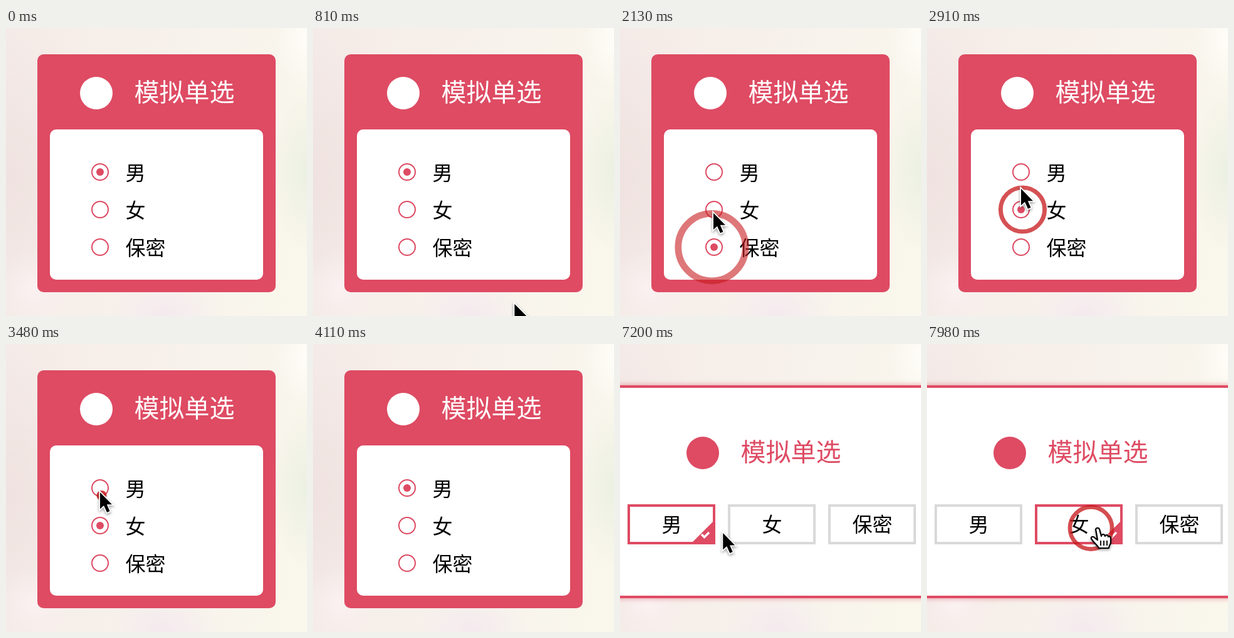
An HTML page for the animation above (8 s loop, 480x460 px).

```html
<!DOCTYPE html>
<html lang="zh-CN">
<head>
<meta charset="utf-8">
<title>模拟单选</title>
<style>
  html, body { margin: 0; width: 100%; height: 100%; overflow: hidden; }
  body {
    background:
      radial-gradient(circle at 45px 415px, #faf1f1, transparent 60px),
      radial-gradient(ellipse 60px 130px at 480px 230px, #ebf0e2, transparent),
      radial-gradient(ellipse 50px 80px at 480px 20px, #fefdf8, transparent),
      radial-gradient(ellipse 90px 70px at 250px 460px, #f4eaef, transparent),
      radial-gradient(ellipse 160px 260px at 0 240px, #efe2e0, transparent),
      linear-gradient(100deg, #f5ebe8, #f8f4ec 70%, #faf7ec);
  }
  svg { display: block; width: 480px; height: 460px; }
  text { font-family: "Noto Sans CJK SC", "Noto Sans CJK", sans-serif; font-size: 32px; }
  .title { font-size: 40px; }
  .mid { text-anchor: middle; }
  .glow { filter: drop-shadow(0 0 4px #de4b6399); }
  .pointer { filter: drop-shadow(0 2px 2px #0006); }
</style>
</head>
<body>
<svg viewBox="0 0 480 460">
  <g id="card">
    <rect x="50" y="42" width="380" height="380" rx="10" fill="#de4b63"/>
    <rect x="70" y="162" width="340" height="240" rx="10" fill="#fff"/>
    <circle cx="144" cy="104" r="26" fill="#fff"/>
    <text class="title" x="204.5" y="117" fill="#fff">模拟单选</text>
    <g id="radios"></g>
  </g>
  <g id="panel">
    <rect class="glow" x="-20" y="66" width="520" height="340" fill="#de4b63"/>
    <rect y="70" width="480" height="332" fill="#fff"/>
    <circle cx="132" cy="174" r="26" fill="#de4b63"/>
    <text class="title" x="192.5" y="187" fill="#de4b63">模拟单选</text>
    <g id="buttons"></g>
  </g>
  <circle id="press" r="8" fill="#c8191c" opacity=".85"/>
  <circle id="ring" fill="none" stroke="#c8191c"/>
  <g id="arrow" class="pointer">
    <path transform="translate(-2.5 -5)" d="M0 0V26.5L6 21L11 32L15.5 30L10.8 19.3H19Z"
      stroke="#fff" stroke-width="3.5" paint-order="stroke"/>
  </g>
  <g id="hand" class="pointer">
    <path d="M-2 2C-1-1 3-1 4 2L7 13C8 9 12 9 13 13C14 10 18 11 18 14C20 12 22 14 22 17V23C22 26 19 28 19 32H3C1 27-5 24-9 17C-10 13-5 13-3 16L1 19Z"
      fill="#fff" stroke="#000" stroke-width="2.2" stroke-linejoin="round"/>
    <path d="M6 20V28M11 20V28M16 20V28" stroke="#000" stroke-width="1.8"/>
  </g>
</svg>
<script>
const LOOP = 8000, STEP = 30, SWITCH = 6300, RING = 475;
const RED = '#de4b63', GREY = '#d9d9d9';
const labels = ['男', '女', '保密'];
const $ = id => document.getElementById(id);
const show = (el, on) => el.setAttribute('visibility', on ? 'visible' : 'hidden');
const setAll = (el, attrs) => Object.entries(attrs).forEach(([k, v]) => el.setAttribute(k, v));

$('radios').innerHTML = labels.map((label, i) => `
  <g transform="translate(150 ${230 + 60 * i})">
    <circle r="13" fill="none" stroke="${RED}" stroke-width="2"/>
    <circle class="mark" r="6" fill="${RED}"/>
    <text x="40.5" y="13">${label}</text>
  </g>`).join('');

$('buttons').innerHTML = labels.map((label, i) => `
  <g transform="translate(${12 + 160 * i} 256)">
    <rect class="frame" x="2" y="2" width="136" height="60" fill="#fff" stroke-width="4"/>
    <text class="mid" x="70.5" y="44">${label}</text>
    <g class="mark">
      <path d="M140 24V64H100Z" fill="${RED}"/>
      <path d="M118 48L122.500 52.500L130 45" fill="none" stroke="#fff" stroke-width="3.500"/>
    </g>
  </g>`).join('');

const groups = [$('radios'), $('buttons')];
const marks = groups.map(g => g.querySelectorAll('.mark'));
const frames = groups[1].querySelectorAll('.frame');

const linear = p => p;
const easeIn = p => p * p;
const easeOut = p => 1 - (1 - p) ** 2;

// Each move bends towards `via`; the pointer rests between moves.
const moves = [
  { start: 240, end: 1020, from: [478, 285], via: [354, 549], to: [154, 388], ease: easeIn },
  { start: 1050, end: 1500, via: [120, 370], to: [146.5, 350], ease: linear },
  { start: 1920, end: 2280, to: [152.5, 290], ease: easeOut },
  { start: 2760, end: 3180, to: [152.5, 242], ease: easeOut },
  { start: 3660, end: 3960, to: [190, 32], ease: easeIn, leaves: true },
  { start: 6630, end: 7410, from: [2, 55], via: [80, 370], to: [253, 295], ease: linear },
  { start: 7440, end: 7500, to: [261.5, 294], ease: linear },
  { start: 7860, end: 7980, to: [271, 294], ease: easeOut }
];
moves.forEach((m, i) => {
  m.from ??= moves[i - 1].to;
  m.via ??= m.from.map((v, axis) => (v + m.to[axis]) / 2);
});

const clicks = [
  { down: 1740, up: 1830, pick: 2 },
  { down: 2610, up: 2730, pick: 1 },
  { down: 3480, up: 3612, pick: 0 },
  { down: 7680, up: 7810, pick: 1 }
];

function pointerAt(t) {
  const m = moves.findLast(m => t >= m.start);
  if (!m || (m.leaves && t > m.end)) return null;
  const s = m.ease(Math.min(1, (t - m.start) / (m.end - m.start))), q = 1 - s;
  return m.from.map((v, axis) => q * q * v + 2 * q * s * m.via[axis] + s * s * m.to[axis]);
}

function drawPointer(t) {
  const tip = pointerAt(t);
  const overButton = tip && t >= SWITCH && tip[1] > 256 && tip[1] < 320 &&
    tip[0] > 12 && (tip[0] - 12) % 160 < 140;
  show($('arrow'), tip && !overButton);
  show($('hand'), overButton);
  if (tip) $(overButton ? 'hand' : 'arrow').setAttribute('transform', `translate(${tip})`);
}

function drawClick(t) {
  const click = clicks.find(c => t >= c.down && t < c.up + RING);
  const released = click && t >= click.up;
  show($('press'), click && !released);
  show($('ring'), released);
  if (!click) return;
  const [cx, cy] = pointerAt(click.down);
  setAll($('press'), { cx, cy });
  if (!released) return;
  const age = t - click.up, r = 8 + .17 * age;
  setAll($('ring'), {
    cx, cy, r: r * .91, 'stroke-width': r * .18, opacity: 1 - .65 * age / RING
  });
}

function draw(t) {
  const second = t >= SWITCH;
  const last = clicks.findLast(c => t >= c.up && (c.up >= SWITCH) === second);
  const picked = last ? last.pick : 0;
  $('card').style.display = second ? 'none' : '';
  $('panel').style.display = second ? '' : 'none';
  marks.forEach(list => list.forEach((mark, i) => { mark.style.opacity = +(i === picked); }));
  frames.forEach((frame, i) => frame.setAttribute('stroke', i === picked ? RED : GREY));
  drawClick(t);
  drawPointer(t);
}

const start = performance.now();
function tick() {
  const t = (performance.now() - start) % LOOP;
  draw(Math.floor(t / STEP) * STEP);
  requestAnimationFrame(tick);
}
tick();
</script>
</body>
</html>
```
